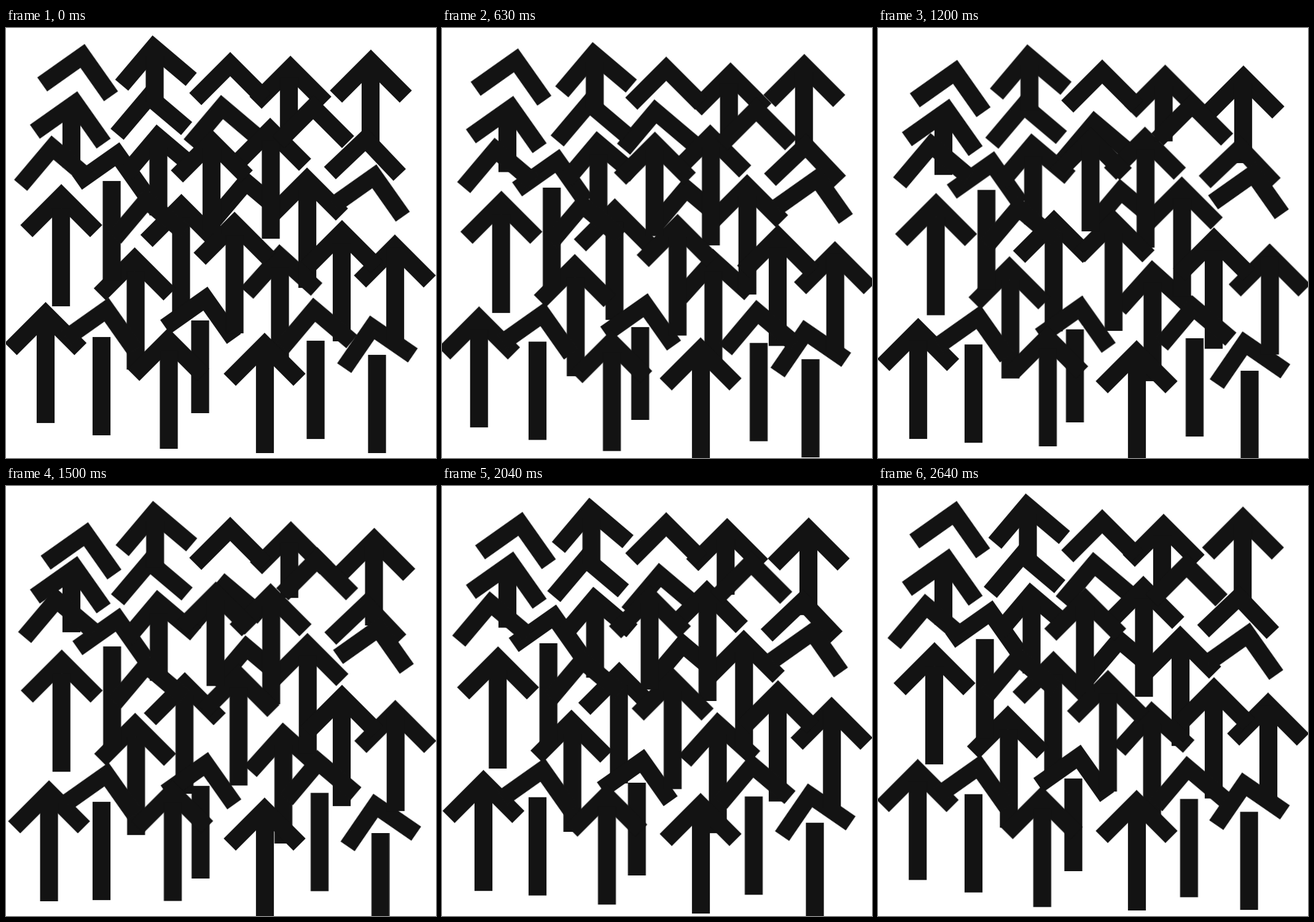
Animation, 700 px wide and 700 px high, one loop 2.67 s. Source, as an HTML page:

```html
<!DOCTYPE html>
<html lang="en">
<head>
<meta charset="utf-8">
<title>Drifting arrows</title>
<style>
  html, body { margin: 0; width: 100%; height: 100%; overflow: hidden; background: #fff; }
  svg { display: block; width: 100vw; height: 100vh; fill: #131313; }
  g { animation: 2670ms linear infinite; }
  #a { animation-name: a; }
  #b { animation-name: b; }
  #c { animation-name: c; }
  #d { animation-name: d; }
  @keyframes a {
    0% { transform: translate(0, 0); }
    35.6% { transform: translate(-6.4px, 10.8px); }
    51.7% { transform: translate(6.1px, 36.7px); }
    76.4% { transform: translate(3px, 16.2px); }
    100% { transform: translate(0, -2.5px); }
  }
  @keyframes b {
    0% { transform: translate(0, 0); }
    35.6% { transform: translate(10px, 16.3px); }
    51.7% { transform: translate(.6px, 13.3px); }
    76.4% { transform: translate(1.2px, 7px); }
    100% { transform: translate(2px, -.2px); }
  }
  @keyframes c {
    0% { transform: translate(0, 0); }
    35.6% { transform: translate(0, 11.3px); }
    51.7% { transform: translate(0, 12.8px); }
    76.4% { transform: translate(0, 3.6px); }
    100% { transform: translate(0, -1.6px); }
  }
  @keyframes d {
    0% { transform: translate(0, 0); }
    35.6% { transform: translate(17.4px, 5.5px); }
    51.7% { transform: translate(7.2px, -10.8px); }
    76.4% { transform: translate(3.5px, -3.6px); }
    100% { transform: translate(2.3px, .6px); }
  }
</style>
</head>
<body>
<svg viewBox="0 0 700 700">
  <g id="a"></g>
  <g id="b"></g>
  <g id="c"></g>
  <g id="d"></g>
</svg>
<script>
  const HEAD = '0,0 66.7,66.7 46.9,86.5 0,39.6 -46.9,86.5 -66.7,66.7';
  const LEFT = 9.8, RIGHT = -4.8, FAR = -10.5;

  // head: apex x, apex y, tilt
  const head = (x, y, tilt = 0) =>
    `<polygon points="${HEAD}" transform="translate(${x} ${y}) rotate(${tilt})"/>`;

  // stem: centre x, bottom y, length
  const stem = (x, y, len = 160) =>
    `<rect x="${x - 14.6}" y="${y - len}" width="29.2" height="${len}"/>`;

  function fill(id, heads, stems) {
    document.getElementById(id).innerHTML =
      heads.map(h => head(...h)).join('') + stems.map(s => stem(...s)).join('');
  }

  fill('a',
    [[128, 26, LEFT], [594, 35], [350, 109, RIGHT], [285.5, 270],
     [445, 352, -3], [64.5, 446], [592.5, 468, FAR]],
    [[593.5, 194, 130], [285, 468], [446, 549], [64.5, 643], [604, 692]]);

  fill('b',
    [[238.5, 12, RIGHT], [231, 92, RIGHT], [463, 45], [586, 161, 1.5],
     [184.5, 186, LEFT], [245, 157, RIGHT], [430, 146], [389, 231, RIGHT],
     [90, 254], [490, 227], [633, 336], [209.5, 357], [328, 421, LEFT]],
    [[242, 120, 75], [460.5, 170, 90], [172, 411, 162], [248, 305, 110],
     [431, 343], [89.5, 453], [490.5, 423], [633.5, 517], [211, 556],
     [316, 627, 151]]);

  fill('c',
    [[365, 39], [116, 103, LEFT], [227, 261, RIGHT], [547, 312.5],
     [167, 439, LEFT], [421, 496]],
    [[106.5, 227, 90], [546.5, 510], [155.5, 663], [421.5, 692]]);

  fill('d',
    [[500, 109], [74, 175, RIGHT], [335, 165], [372, 299],
     [603, 222, LEFT], [264, 488], [500, 439, RIGHT]],
    [[334.5, 335, 140], [372, 497], [265, 685], [504, 669]]);
</script>
</body>
</html>
```
